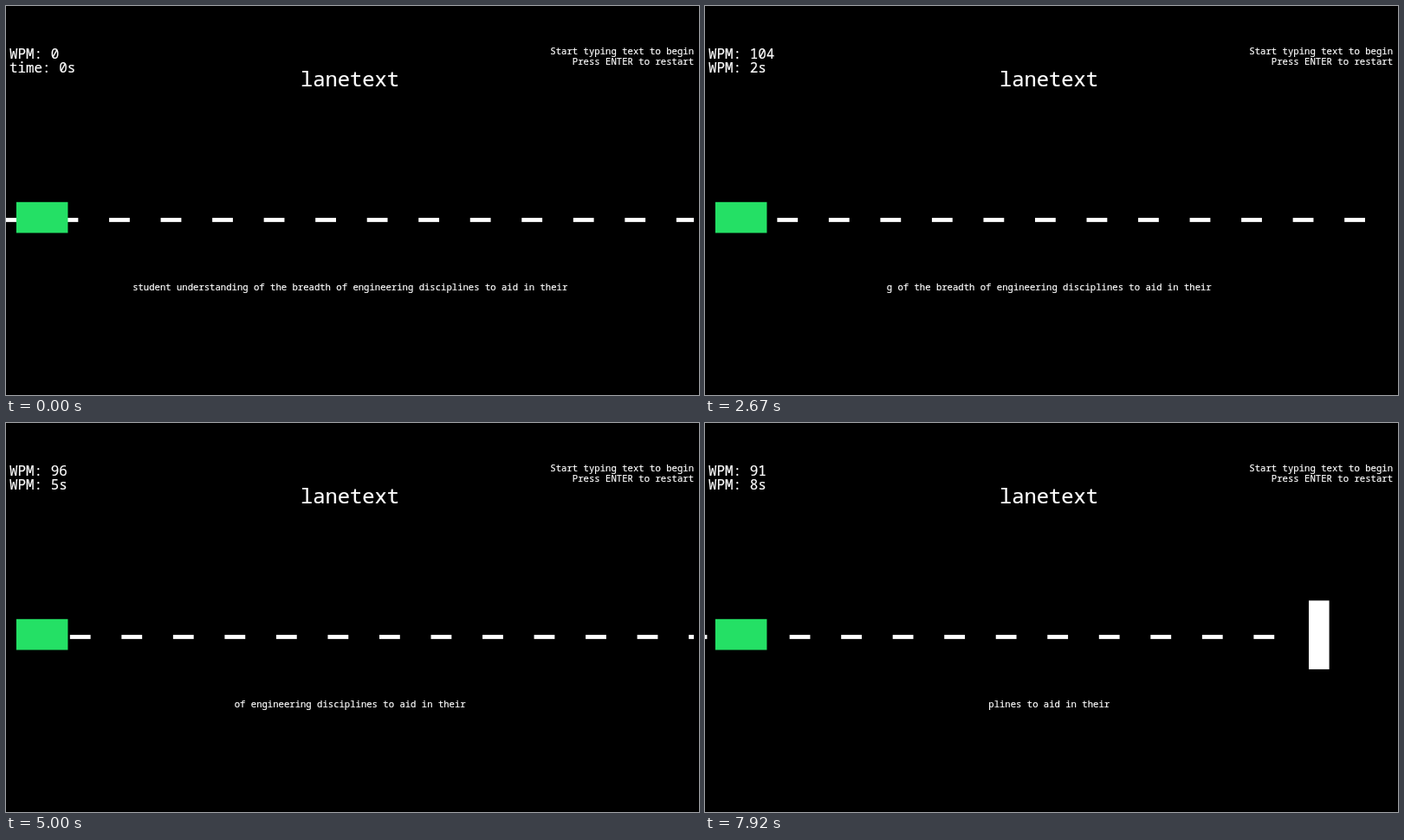
These frames come from a looping animation (800 px wide and 450 px high, 8000 ms). An HTML page with a canvas:

```html
<!DOCTYPE html>
<html lang="en">
<head>
<meta charset="utf-8">
<title>Typing race</title>
<style>
  html, body { margin: 0; height: 100%; overflow: hidden; background: #000; }
  canvas { display: block; }
</style>
</head>
<body>
<canvas id="stage" width="800" height="450"></canvas>
<script>
const ctx = document.getElementById('stage').getContext('2d');

const LOOP = 8000, FPS = 12, CAPTURE_FPS = 25;
const SENTENCE = 'student understanding of the breadth of engineering disciplines to aid in their';
const WIDTH = 794;
const UNIT = 0.5953;          // game pixels to stage pixels
const KEY_STEP = 48 * UNIT;   // road travelled per typed letter
const DASH_GAP = 100 * UNIT;
const DASH_COUNT = 39;
const FINISH = 697 + 57 * KEY_STEP;
const TIMER_START = 0.3635;

// [seconds, letters typed]
const TYPING = [[0.33, 1], [0.95, 5], [1.8, 13], [3.3, 26], [4.95, 37],
                [5.95, 48], [6.9, 53], [7.7, 56], [7.88, 57]];

function lettersTyped(time) {
  if (time < TYPING[0][0]) return 0;
  for (let i = 1; i < TYPING.length; i++) {
    const [t0, n0] = TYPING[i - 1], [t1, n1] = TYPING[i];
    if (time < t1) return Math.floor(n0 + (n1 - n0) * (time - t0) / (t1 - t0));
  }
  return TYPING[TYPING.length - 1][1];
}

function rect(x, y, w, h, color = '#fff') {
  ctx.fillStyle = color;
  ctx.fillRect(x, y, w, h);
}

// A hairline outline gives the letters a slightly heavier weight.
function text(string, x, y, size, align) {
  ctx.fillStyle = ctx.strokeStyle = '#fff';
  ctx.lineWidth = 0.2;
  ctx.lineJoin = 'round';
  ctx.font = `${size}px "Noto Sans Mono", monospace`;
  ctx.textAlign = align;
  ctx.fillText(string, x, y);
  ctx.strokeText(string, x, y);
}

function draw(ms) {
  const time = Math.floor((ms + 5) * FPS / 1000) / FPS;
  const typed = lettersTyped(time);
  const elapsed = Math.max(0, Math.round(time * CAPTURE_FPS) / CAPTURE_FPS - TIMER_START);
  const wpm = elapsed ? Math.round(typed * 12 / elapsed) : 0;
  const travelled = typed * KEY_STEP;

  rect(0, 0, 800, 450, '#000');
  for (let i = 0; i < DASH_COUNT; i++) rect(i * DASH_GAP - travelled, 245.1, 40 * UNIT, 8 * UNIT);
  rect(FINISH - travelled, 205.4, 23.6, 79.5);
  rect(WIDTH, 0, 800 - WIDTH, 450, '#000');
  rect(20 * UNIT, 226.8, 100 * UNIT, 60 * UNIT, '#24e065');

  text(`WPM: ${wpm}`, 4, 60.7, 15.88, 'left');
  text(`${typed ? 'WPM' : 'time'}: ${Math.round(elapsed)}s`, 4, 76.6, 15.88, 'left');
  text('lanetext', 397, 93, 23.8, 'center');
  text('Start typing text to begin', WIDTH, 56.2, 10.63, 'right');
  text('Press ENTER to restart', WIDTH, 68.2, 10.63, 'right');
  text(SENTENCE.slice(typed), 397.2, 328.6, 10.6, 'center');
}

const start = performance.now();
function tick() {
  draw((performance.now() - start) % LOOP);
  requestAnimationFrame(tick);
}
tick();
</script>
</body>
</html>
```
